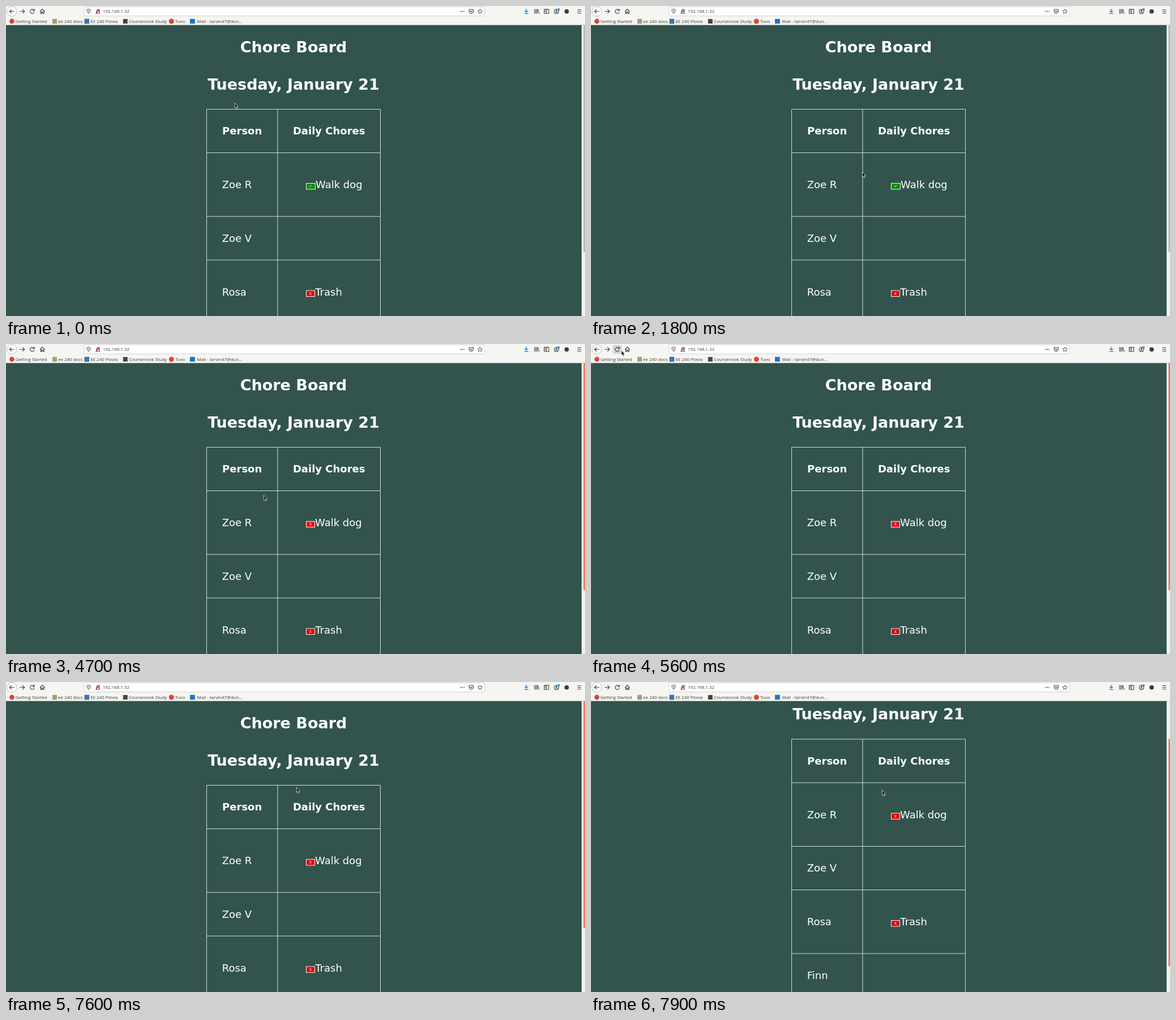
An HTML page for the animation above (8 s loop, 1023 by 548 pixels).

```html
<!DOCTYPE html>
<html lang="en">
<head>
<meta charset="utf-8">
<title>Chore Board</title>
<style>
html, body { margin: 0; height: 100%; overflow: hidden; }
svg { display: block; width: 100vw; height: 100vh; }
#page text { font: 18px "DejaVu Sans", sans-serif; fill: #fff; }
#page .h { font-weight: bold; text-anchor: middle; }
#page .big { font-size: 27px; }
#page .mark { font-size: 7px; text-anchor: middle; }
#page .box { stroke: #f2f2f2; }
.grid { fill: none; stroke: #e6ebea; stroke-width: .9; }
#chrome text { font: 7.9px "Open Sans", "Noto Sans", sans-serif; fill: #3b3b3b; }
.icon { fill: none; stroke: #424240; stroke-width: 1.15; stroke-linejoin: round; }
</style>
</head>
<body>
<svg viewBox="0 0 1023 548" preserveAspectRatio="none">
  <rect width="1023" height="548" fill="#32544c"/>

  <g id="page">
    <text class="h big" x="508" y="82.3">Chore Board</text>
    <text class="h big" x="508" y="147.8">Tuesday, January 21</text>
    <path class="grid" d="M354.5 182.5H661.5V638.5H354.5ZM480 182.5V638.5M354.5 259.5H661.5M354.5 372H661.5M354.5 449H661.5M354.5 561.5H661.5"/>
    <text class="h" x="417.2" y="227.2">Person</text>
    <text class="h" x="570.7" y="227.2">Daily Chores</text>
    <text x="381.7" y="322">Zoe R</text>
    <text x="381.7" y="416.7">Zoe V</text>
    <text x="381.7" y="511.5">Rosa</text>
    <text x="381.7" y="606.2">Finn</text>

    <rect class="box" id="dogBox" x="530.5" y="313.5" height="10.5"/>
    <rect id="focus" x="532.3" y="315.3" width="11.6" height="7" fill="none" stroke="#fff" stroke-width=".5" stroke-dasharray=".6 .6"/>
    <text class="mark" id="dogMark" y="321.4"></text>
    <text id="dogText" y="322">Walk dog</text>

    <rect class="box" x="530.5" y="503" width="15" height="10.5" fill="#e30008"/>
    <text class="mark" x="538" y="510.9">X</text>
    <text x="546.3" y="511.5">Trash</text>
  </g>

  <rect x="1017" y="33" width="6" height="515" fill="#f3f2ef"/>
  <rect id="thumb" x="1020.3" width="2.7" height="402"/>

  <g id="chrome">
    <rect width="1023" height="33.5" fill="#f5f5f2"/>
    <path d="M0 33.4H1023" stroke="#c9c9c5" stroke-width=".8"/>
    <rect id="reloadHover" x="38.5" y="2" width="16" height="15.5" rx="2" fill="#d5d5d2"/>
    <circle id="back" cx="10.3" cy="9.5" r="8.6" stroke="#aeaeab" stroke-width=".8"/>
    <rect x="138" y="1.5" width="708" height="16" rx="2" fill="#fff" stroke="#cacac7" stroke-width=".8"/>
    <text x="171" y="12.4">192.168.1.32</text>

    <g class="icon">
      <path d="M14.6 9.5H6.4M10 5.8L6.3 9.5L10 13.2"/>
      <path d="M24.4 9.5H32.6M29 5.8L32.7 9.5L29 13.2"/>
      <path d="M49.5 7.4A3.7 3.7 0 1 0 50 10.6M50.2 5V8.2H47"/>
      <path d="M60 9.6L64.2 5.5L68.4 9.6M61.4 9V13.3H63.1V10.6H65.3V13.3H67V9"/>
      <path d="M142.8 6.4L146 5.3L149.2 6.4Q149.3 11.5 146 13.4Q142.7 11.5 142.8 6.4ZM146 7V11.5" stroke-width=".9"/>
      <path d="M160 9H165V13H160ZM161 9V7Q162.5 4.5 164 7V9" stroke-width="1.2"/>
      <path d="M158.5 13.5L166 5.4" stroke="#d7264c"/>
      <path d="M802.5 9.6H810" stroke-width="1.7" stroke-dasharray="1.7 1.5"/>
      <path d="M818.3 6H825.7V9Q825 13 822 13Q819 13 818.3 9ZM820 8.3L822 10.3L824 8.3"/>
      <path d="M837.5 5.4L838.7 8.1L841.6 8.4L839.4 10.3L840.1 13.2L837.5 11.7L834.9 13.2L835.6 10.3L833.4 8.4L836.3 8.1Z" stroke-width=".9"/>
      <path d="M919.3 5V11M916.4 8.2L919.3 11.1L922.2 8.2M915.7 13.4H923" stroke="#1683dc" stroke-width="1.3"/>
      <path d="M934 5.5V13.5M936.3 5.5V13.5M938.5 5.5V13.5M939.7 6L942 13.5"/>
      <path d="M951 5.8H959V13.2H951ZM954.7 6V13M952.3 8H953.7M952.3 10H953.7"/>
      <circle cx="972.6" cy="9.7" r="4"/>
      <path d="M970.2 12.4Q972.6 9.7 975 12.4" />
      <circle cx="972.6" cy="8.5" r="1.1"/>
      <path d="M1009.5 6.5H1016.3M1009.5 9.5H1016.3M1009.5 12.5H1016.3"/>
    </g>
    <circle cx="976.5" cy="6" r="2" fill="#1690ef"/>
    <circle cx="990.6" cy="9.6" r="3.9" fill="#3c3c3a"/>

    <circle cx="10.4" cy="27" r="4.4" fill="#d9433d"/>
    <rect x="82" y="22.8" width="8" height="8.4" fill="#a3a071"/>
    <rect x="138.5" y="22.6" width="8.6" height="8.8" fill="#3c75ad"/>
    <rect x="206.8" y="23" width="8" height="8" fill="#4a4639"/>
    <circle cx="292.3" cy="27" r="4.5" fill="#e5432b"/>
    <rect x="325" y="22.8" width="8.8" height="8.4" fill="#1478c8"/>
    <text x="16.8" y="29.6">Getting Started</text>
    <text x="92" y="29.6">ee 240 docs</text>
    <text x="149.3" y="29.6">EE 240 Plovia</text>
    <text x="217" y="29.6">Coursenook Study</text>
    <text x="299" y="29.6">Tuvo</text>
    <text x="337.6" y="29.6">Mail - tarvin47@dun…</text>
  </g>

  <path id="cursor" d="M.4 .4V9.3L2.3 7.5L3.7 10.7L5.2 10L3.8 6.9H6.6Z" fill="#111" stroke="#fff" stroke-width=".7"/>
</svg>
<script>
const LOOP = 8000, STEP = 100;
// Pointer path: time, x, y
const path = [
  [0, 404, 171], [500, 404, 171], [600, 404, 170], [700, 404, 170],
  [1000, 390, 182], [1200, 385, 205], [1600, 437, 275], [1800, 479, 293],
  [2100, 532, 313], [2300, 544, 318], [4300, 544, 318], [4700, 455, 267],
  [4900, 455, 267], [5600, 53.5, 11], [6700, 53.5, 11], [7400, 375, 149],
  [7500, 375, 149], [7600, 513, 186], [7700, 513, 186], [7800, 514, 190],
  [7900, 514, 191]
];
const $ = id => document.getElementById(id);
const set = (id, attrs) => {
  for (const name in attrs) $(id).setAttribute(name, attrs[name]);
};
const within = (t, from, to) => t >= from && t < to;

function pointerAt(t) {
  const next = path.findIndex(key => key[0] >= t);
  if (next < 1) return path[0].slice(1);
  const [t0, x0, y0] = path[next - 1], [t1, x1, y1] = path[next];
  const k = (t - t0) / (t1 - t0);
  return [x0 + (x1 - x0) * k, y0 + (y1 - y0) * k];
}

function draw(now) {
  const t = Math.floor(now % LOOP / STEP) * STEP;
  const [x, y] = pointerAt(t);
  const done = t < 2800 || within(t, 3700, 4400);
  const overReload = x > 38 && x < 55 && y < 18;
  const scroll = t < 7800 ? 0 : t < 7900 ? 30 : 81.5;

  set("cursor", { transform: `translate(${x} ${y})` });
  set("page", { transform: `translate(0 ${-scroll})` });
  set("thumb", { y: 33 + scroll * .83, fill: t < 2700 ? "#b9b8b3" : "#ee7d59" });
  set("dogBox", { width: done ? 16 : 15, fill: done ? "#0b8f10" : "#e30008" });
  set("dogMark", { x: done ? 538.5 : 538 });
  $("dogMark").textContent = done ? "✓" : "X";
  set("dogText", { x: done ? 547 : 546 });
  set("focus", { width: done ? 12.6 : 11.6, opacity: +within(t, 2700, 6800) });
  set("reloadHover", { opacity: +overReload });
  set("back", { fill: overReload ? "#fafaf8" : "#fff" });
  requestAnimationFrame(draw);
}
draw(0);
</script>
</body>
</html>
```
